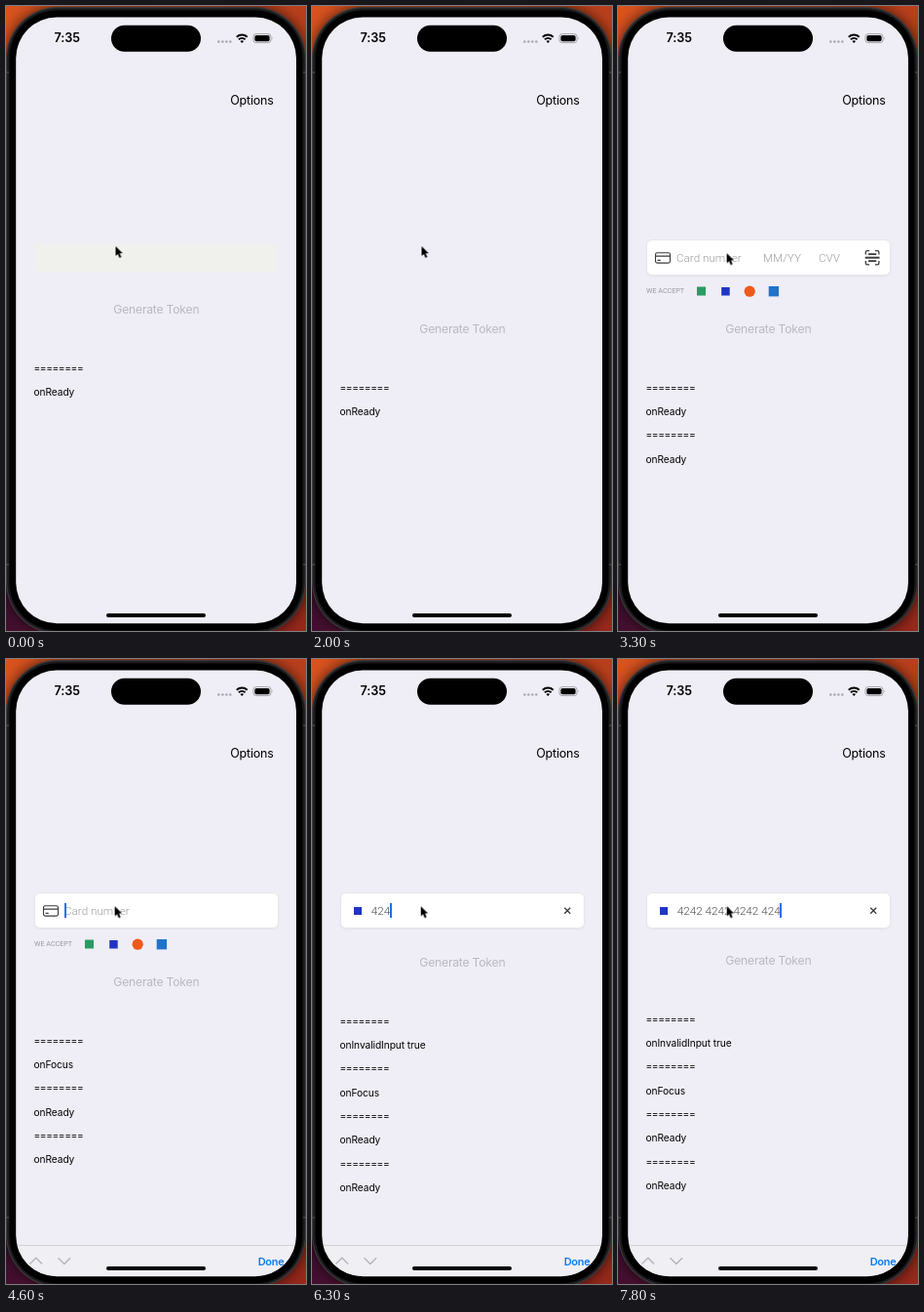
These frames come from a looping animation (308 by 640 pixels, 8000 ms). An HTML page:

```html
<!DOCTYPE html>
<html lang="en">
<head>
<meta charset="utf-8">
<title>Card form</title>
<style>
html, body { margin: 0; width: 100%; height: 100%; overflow: hidden; background: #000; }
#stage {
  position: relative; width: 308px; height: 640px; overflow: hidden;
  font: 12.2px/20px Inter, sans-serif; letter-spacing: -.23px; color: #000;
}
#stage > *, .field > *, .accept > *, .flow > *, .bar > * { position: absolute; white-space: pre; }
svg { left: 0; top: 0; overflow: visible; }
.anim { animation: 8s linear infinite; }

.body { filter: drop-shadow(0 0 7px #000a); }
.time { left: 49.5px; top: 23px; font-size: 12.7px; font-weight: 600; letter-spacing: -.05px; }
.options { left: 230.3px; top: 87px; font-size: 12.5px; }
.ghost { left: 29px; top: 243px; width: 249px; height: 29px; background: #f0f0ed; animation-name: ghost; }

.field {
  left: 28.5px; top: 239px; width: 249px; height: 34.5px; border: 1px solid #e6e6ea; border-radius: 6px;
  background: #fff; box-shadow: 0 1px 2px #0000000d;
  font: 300 11.7px/20px Roboto, sans-serif; letter-spacing: 0; color: #9c9c9c;
  animation-name: field;
}
.field > * { top: 7.5px; }
.field > svg { left: -29.5px; top: -240.5px; }
.number { left: 30.5px; animation-name: untilTyped; }
.expiry { left: 119.5px; }
.cvv { left: 176.5px; }
.blurred { animation-name: blurred; }
.icon { animation-name: icon; }
.brand { animation-name: brand; }
.clear { animation-name: typed; }
.digits { left: 31.3px; color: #4c4c4c; }
.digits span { font-size: 0; }
.caret {
  display: inline-block; width: 1.8px; height: 15px; margin: 0 -2px 0 -.5px;
  vertical-align: -3.5px; background: #1c70ee; animation-name: caret;
}

.accept { left: 0; top: 0; animation-name: accept; }
.accept > b { left: 29px; top: 282px; font: 400 7.2px/20px Roboto, sans-serif; letter-spacing: 0; color: #98979d; }

.flow { left: 0; top: 0; animation-name: flow; }
.button { left: 110.3px; top: 320.5px; color: #b9b8bf; }
.log { left: 28.5px; top: 379px; font-size: 10.2px; line-height: 24.3px; letter-spacing: -.08px; }
.log div { height: 48.6px; overflow: hidden; }
.log div::before { content: "========"; display: block; position: relative; top: -1.2px; letter-spacing: -.4px; }
.ready { animation-name: ready; }
.focus { animation-name: focus; }
.invalid { animation-name: invalid; }

.screen { left: 10.2px; top: 11.5px; width: 287.8px; height: 620.7px; border-radius: 42px; overflow: hidden; }
.bar {
  position: absolute; left: 0; top: 588px; width: 100%; height: 40px;
  border-top: 1px solid #d3d2d8; background: #f0eff4; animation-name: bar;
}
.done { left: 248.5px; top: 6px; font-size: 11px; font-weight: 600; letter-spacing: -.3px; color: #0a7aea; }
.home { left: 102.8px; top: 622px; width: 102.7px; height: 4px; border-radius: 2px; background: #000; }
.pointer { animation-name: pointer; }

@keyframes ghost { 0%, 1% { opacity: 1 } 2.4%, 100% { opacity: 0 } }
@keyframes field { 0%, 26% { opacity: 0 } 29%, 100% { opacity: 1 } }
@keyframes accept { 0%, 27.5% { opacity: 0 } 31%, 73% { opacity: 1 } 74.7%, 100% { opacity: 0 } }
@keyframes blurred { 0%, 53.75% { opacity: 1 } 56.5%, 100% { opacity: 0 } }
@keyframes untilTyped { 0%, 73.4% { opacity: 1 } 73.5%, 100% { opacity: 0 } }
@keyframes typed { 0%, 73.4% { opacity: 0 } 73.5%, 100% { opacity: 1 } }
@keyframes icon { 0%, 72.9% { opacity: 1 } 73.8%, 100% { opacity: 0 } }
@keyframes brand { 0%, 75% { opacity: 0 } 76.2%, 100% { opacity: 1 } }
@keyframes caret {
  0%, 54.8% { opacity: 0 } 54.9%, 64.8% { opacity: 1 }
  66.2%, 73.4% { opacity: 0 } 73.5%, 100% { opacity: 1 }
}
@keyframes flow {
  0%, 1% { transform: translateY(-20px) }
  2.4%, 73.9% { transform: none; animation-timing-function: ease-in-out }
  78.75% { transform: translateY(-19.5px); animation-timing-function: ease-out }
  82%, 100% { transform: translateY(-22.3px) }
}
@keyframes ready { 0%, 27.4% { height: 0 } 27.5%, 100% { height: 48.6px } }
@keyframes focus { 0%, 54.8% { height: 0 } 54.9%, 100% { height: 48.6px } }
@keyframes invalid { 0%, 73.4% { height: 0 } 73.5%, 100% { height: 48.6px } }
@keyframes bar {
  0%, 53.7% { transform: translateY(40px); animation-timing-function: ease-out }
  57.2%, 100% { transform: none }
}
@keyframes pointer {
  0%, 36% { transform: translate(112.5px, 246px); animation-timing-function: ease-in-out }
  40%, 100% { transform: translate(111.7px, 253.3px) }
}
</style>
</head>
<body>
<div id="stage">
  <svg width="308" height="640">
    <defs>
      <linearGradient id="wall" x2="1" y2="0">
        <stop stop-color="#d9531f"/><stop offset="1" stop-color="#b93f1c"/>
      </linearGradient>
      <linearGradient id="floor" x2="1" y2="0">
        <stop stop-color="#430f30"/><stop offset="1" stop-color="#98291b"/>
      </linearGradient>
    </defs>
    <rect width="308" height="320" fill="url(#wall)"/>
    <rect y="320" width="308" height="320" fill="url(#floor)"/>
    <rect class="body" y="1" width="308" height="642" rx="53" fill="#39383b"/>
    <rect x="1.2" y="2.2" width="305.6" height="639.6" rx="52" fill="#1b1b1d"/>
    <rect x="3.5" y="4.5" width="301" height="635" rx="49" fill="#000"/>
    <path d="M0 68h3M305 68h3M0 572h3M305 572h3" stroke="#55545a"/>
    <rect x="10.2" y="11.5" width="287.8" height="620.7" rx="42" fill="#efeef6"/>
    <rect x="108" y="19.7" width="92" height="27" rx="13.5"/>
    <g fill="#a9a8af">
      <circle cx="218.3" cy="36.5" r="1.3"/><circle cx="222.3" cy="36.5" r="1.3"/>
      <circle cx="226.3" cy="36.5" r="1.3"/><circle cx="230.3" cy="36.5" r="1.3"/>
    </g>
    <g fill="none" stroke="#000" stroke-width="2">
      <path d="M236.8 31.7a7.9 7.9 0 0 1 10.9 0M238.9 34.2a4.9 4.9 0 0 1 6.7 0"/>
      <path d="M242.25 38l-1.8-2a2.7 2.7 0 0 1 3.6 0z" fill="#000" stroke="none"/>
    </g>
    <rect x="254" y="28.6" width="18" height="9" rx="2.8" fill="none" stroke="#9b9aa1" stroke-width=".9"/>
    <rect x="255.4" y="30" width="15.2" height="6.2" rx="1.7"/>
    <path d="M273.4 31.6q1.2 1.5 0 3z" fill="#9b9aa1"/>
  </svg>
  <div class="time">7:35</div>
  <div class="options">Options</div>
  <div class="ghost anim"></div>

  <div class="field anim">
    <svg width="308" height="640" fill="none" stroke="#3a3a3c">
      <g class="icon anim">
        <rect x="38.5" y="252.7" width="15" height="10.4" rx="1.8" stroke-width="1.1"/>
        <path d="M38.5 256.2h15M40.5 260.4h3.2" stroke-width="1.2"/>
      </g>
      <rect class="brand anim" x="43" y="254" width="8" height="8" fill="#1f35c4" stroke="none"/>
      <g class="blurred anim" stroke-width="1.3">
        <path d="M254.3 254.5v-2.2q0-1.6 1.6-1.6h2.3M264 250.7h2.3q1.6 0 1.6 1.6v2.2M267.9 261v2.2q0 1.6-1.6 1.6H264M258.2 264.8h-2.3q-1.6 0-1.6-1.6V261"/>
        <path d="M257 254.2h8.3M257 261.2h8.3" stroke-width="1.8"/>
        <path d="M253.7 257.7h14.8" stroke-width="2"/>
      </g>
      <path class="clear anim" d="M259.2 254.8l6 6m0-6l-6 6" stroke-width="1.3"/>
    </svg>
    <div class="number anim">Card number</div>
    <div class="expiry blurred anim">MM/YY</div>
    <div class="cvv blurred anim">CVV</div>
    <div class="digits"><i class="caret anim"></i></div>
  </div>

  <div class="accept anim">
    <b>WE ACCEPT</b>
    <svg width="308" height="640">
      <rect x="81" y="287.5" width="9" height="9" fill="#2c9a63"/>
      <rect x="106.2" y="288" width="8.5" height="8.5" fill="#1f35c4"/>
      <circle cx="135.2" cy="292.2" r="5.6" fill="#ee5a1c"/>
      <rect x="154.7" y="287" width="10.4" height="10.4" fill="#1f73c9"/>
    </svg>
  </div>

  <div class="flow anim">
    <div class="button">Generate Token</div>
    <div class="log">
      <div class="invalid anim">onInvalidInput true</div><div class="focus anim">onFocus</div><div class="ready anim">onReady</div><div>onReady</div>
    </div>
  </div>

  <div class="screen">
    <div class="bar anim">
      <svg width="288" height="40" fill="none" stroke="#b4b3b9" stroke-width="1.3">
        <path d="M14.5 18.5l6.3-6.3 6.3 6.3M43.5 12.2l6.3 6.3 6.3-6.3"/>
      </svg>
      <div class="done">Done</div>
    </div>
  </div>
  <div class="home"></div>
  <svg width="308" height="640">
    <path class="pointer anim" d="M0 0v10l2.3-2 1.7 3.9 1.9-.8-1.7-3.8h3.1z" stroke="#fff" stroke-width=".9" paint-order="stroke"/>
  </svg>
</div>
<script>
const LOOP = 8000, LEAD = 25;
const keys = [5900, 6100, 6300, 6500, 6600, 6800, 6900, 7000, 7100, 7200, 7300, 7500, 7600, 7700, 7800];
const caret = document.querySelector('.caret');

// The log list is block layout, so drop the whitespace between its entries.
for (const node of [...document.querySelector('.log').childNodes]) {
  if (node.nodeType === Node.TEXT_NODE) node.remove();
}

// Each digit takes up room only once its key has been pressed.
keys.forEach((time, i) => {
  const digit = document.createElement('span');
  digit.textContent = (i && i % 4 === 0 ? ' ' : '') + '42'[i % 2];
  caret.before(digit);
  digit.animate([
    { fontSize: '0px', easing: 'step-end' },
    { fontSize: '11.7px', offset: (time - LEAD) / LOOP },
    { fontSize: '11.7px' }
  ], { duration: LOOP, iterations: Infinity });
});
</script>
</body>
</html>
```
